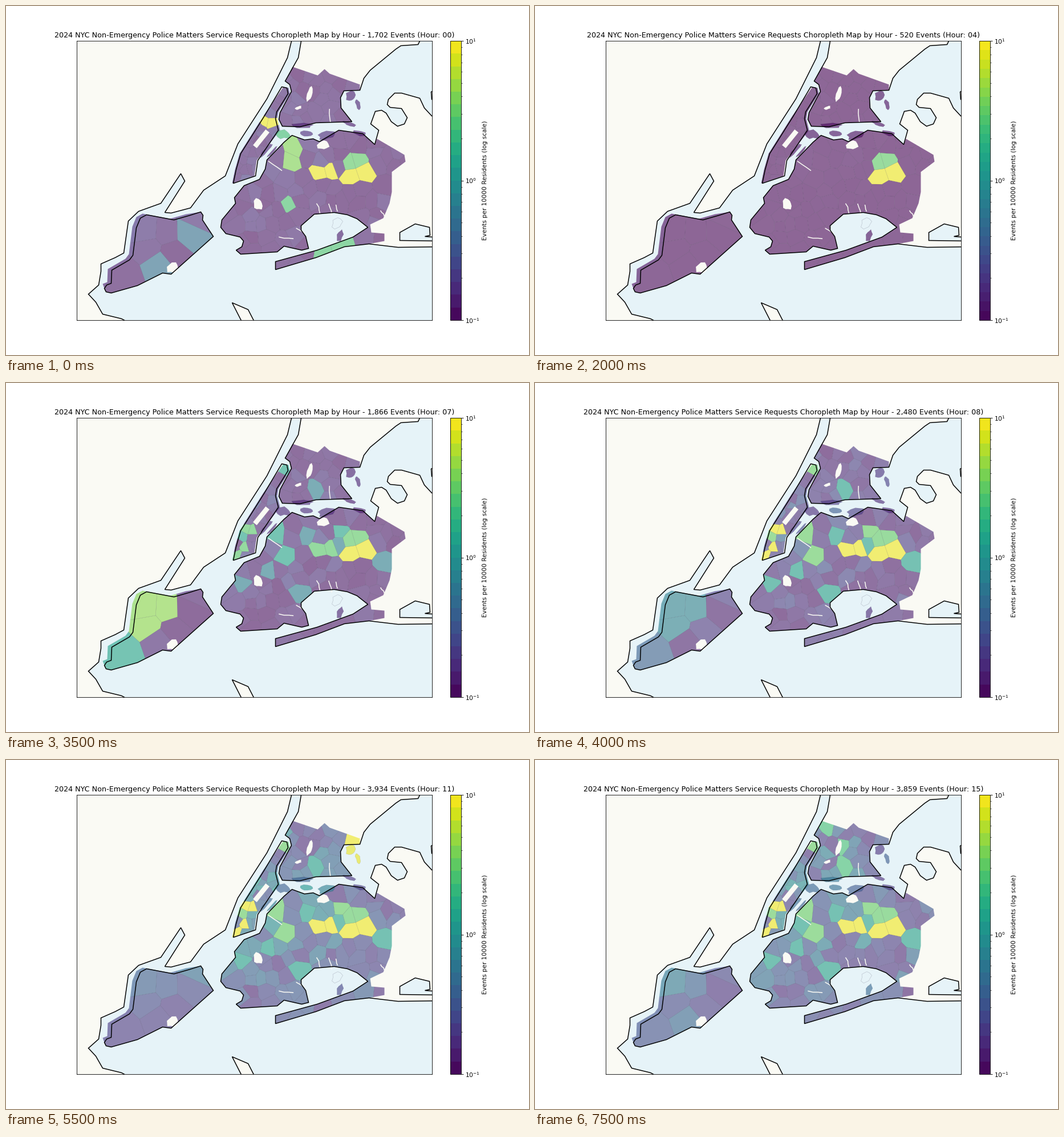
A matplotlib script that plays this animation: 917 px wide and 611 px high, repeating every 8000 ms.

```python
import numpy as np
import matplotlib.pyplot as plt
from matplotlib.animation import FuncAnimation
from matplotlib.cm import ScalarMappable
from matplotlib.collections import PolyCollection
from matplotlib.colors import ListedColormap, LogNorm
from matplotlib.patches import Polygon
from matplotlib.path import Path

W, H = 917, 611
K = W / 1200
LAND, WATER = "#fafaf4", "#e6f3f8"
viridis = plt.get_cmap("viridis")

plt.rcParams.update({
    "font.family": "DejaVu Sans", "font.size": 10 * K,
    "axes.linewidth": 0.8 * K, "axes.titlepad": 6 * K, "axes.labelpad": 4 * K,
    "ytick.major.size": 3.5 * K, "ytick.major.width": 0.8 * K,
    "ytick.major.pad": 3.5 * K,
    "ytick.minor.size": 2 * K, "ytick.minor.width": 0.6 * K,
})
fig = plt.figure(figsize=(W / 100, H / 100), dpi=100, facecolor="white")

# The map is laid out in stage pixels, y pointing down.
left, right, low, high = 0.1355, 0.8145, 0.1, 0.9
ax = fig.add_axes([left, low, right - left, high - low])
ax.set(xlim=(left * W - 0.5, right * W - 0.5),
       ylim=((1 - low) * H - 0.5, (1 - high) * H - 0.5),
       xticks=[], yticks=[], facecolor=WATER)


# --- Activity over the day ---------------------------------------------
def events(hour):
    known = [0, 4, 7, 9, 11, 13, 15]
    counts = [1702, 520, 1866, 3296, 3934, 3827, 3859]
    return round(np.exp(np.interp(hour, known, np.log(counts))))


def always(h):
    return 1


def night(h):
    return max(0, 1 - h / 4)


def day(h):
    return np.clip((h - 4) / 4, 0, 1)


def night_and_day(h):
    return min(1, abs(h - 4) / 4)


def pulse(peak):
    return lambda h: np.exp(-(h - peak) ** 2 / 1.5)


# Districts that stand out: profile, top colour level, places
HOT = [
    (always, 0.97, [(604, 296), (627, 288)]),
    (always, 0.74, [(601, 275), (618, 270)]),
    (night_and_day, 0.97, [(551, 290), (567, 286)]),
    (day, 0.97, [(422, 253), (431, 256), (405, 299), (417, 286)]),
    (day, 0.75, [(487, 150), (413, 270), (490, 305), (471, 265), (584, 260)]),
    (day, 0.55, [(583, 280), (525, 262), (508, 366), (540, 187), (665, 317),
                 (410, 350), (460, 330)]),
    (night, 0.97, [(453, 203), (463, 205)]),
    (night, 0.8, [(502, 268), (508, 255)]),
    (night, 0.7, [(556, 429), (585, 421), (486, 224), (495, 346)]),
    (night, 0.35, [(320, 396), (268, 450)]),
    (pulse(7), 0.82, [(245, 395), (280, 397), (250, 423)]),
    (pulse(7), 0.57, [(205, 472)]),
    (pulse(11), 0.97, [(603, 142), (604, 158), (617, 172)]),
    (pulse(13), 0.85, [(486, 224)]),
    (pulse(15), 0.68, [(511, 117), (541, 147), (540, 187)]),
]


# --- Coast ----------------------------------------------------------------
def coast(*pts, fill=LAND):
    ax.add_patch(Polygon(pts, fc=fill, ec="none", zorder=1))
    ax.add_patch(Polygon(pts, fill=False, ec="black", lw=1.4 * K, zorder=6))


BRONX_WEST = [(489, 131), (497, 137), (500, 149), (480, 186), (478, 198),
              (484, 210), (515, 211), (543, 204), (606, 202), (587, 178),
              (586, 160), (592, 148), (620, 147)]
MANHATTAN = [(483, 141), (492, 143), (494, 153), (474, 185), (472, 197),
             (477, 217), (441, 270), (437, 297), (398, 310), (403, 286),
             (411, 258), (452, 193)]
STATEN_SEA = [(341, 360), (345, 366), (344, 374), (363, 403), (289, 469),
              (274, 467), (230, 489), (184, 502), (175, 500), (172, 494)]
STATEN_KILL = [(176, 488), (184, 485), (185, 462), (216, 444), (222, 436),
               (228, 388), (235, 371), (246, 365), (294, 374), (322, 366)]
# Barrier beach, inner bay, west end and north shore of Long Island
ISLAND_SHORE = [
    (636, 416), (593, 421), (543, 440), (472, 461), (472, 447), (545, 427),
    (608, 404), (634, 387), (615, 372), (598, 365), (575, 361), (540, 364),
    (517, 384), (517, 392), (525, 403), (530, 424), (518, 427), (487, 420),
    (475, 430), (411, 434), (403, 427), (413, 421), (416, 411), (410, 404),
    (385, 398), (376, 387), (378, 374), (402, 345), (400, 335), (417, 314),
    (444, 303), (454, 285), (457, 269), (487, 238), (501, 226), (523, 234),
    (538, 232), (549, 237), (583, 217), (625, 223), (646, 242)]
EAST_COAST = [(653, 217), (639, 206), (647, 184), (658, 182), (666, 187),
              (675, 202), (686, 210), (698, 206), (703, 195), (693, 179),
              (673, 177), (668, 172), (670, 163), (681, 152), (693, 152),
              (725, 161), (733, 178), (746, 192), (760, 196)]
EAST_EDGE = [(650, 232), (698, 260), (700, 272), (676, 290), (676, 325),
             (672, 345), (661, 371), (638, 382), (640, 396), (663, 398),
             (663, 411)]

coast((501, 50), (500, 61), (493, 90), (457, 162), (406, 241), (384, 297),
      (346, 322), (323, 353), (289, 362), (278, 361), (313, 306), (306, 293),
      (271, 345), (232, 359), (214, 376), (206, 432), (191, 440), (166, 451),
      (166, 464), (162, 488), (144, 504), (157, 518), (169, 539), (202, 547),
      (215, 554), (110, 560), (110, 50))
coast((518, 50), (517, 61), (512, 90), *BRONX_WEST, (627, 126), (638, 112),
      (683, 75), (692, 69), (722, 67), (730, 50))
coast(*MANHATTAN)
coast(*STATEN_SEA, *STATEN_KILL)
coast((760, 421), (687, 422), *ISLAND_SHORE, *EAST_COAST)
coast((760, 411), (690, 410), (690, 396), (717, 381), (742, 387), (743, 401),
      (734, 403), (760, 405), fill=WATER)
coast((760, 140), (745, 150), (746, 163), (760, 170))
coast((396, 519), (424, 531), (440, 562), (418, 562))


# --- Districts --------------------------------------------------------------
def cut(poly, mid, normal):
    """Keep the part of poly behind the line through mid."""
    out = []
    for a, b in zip(poly, poly[1:] + poly[:1]):
        da, db = (a - mid) @ normal, (b - mid) @ normal
        if da <= 0:
            out.append(a)
        if da * db < 0:
            out.append(a + (b - a) * da / (da - db))
    return out


def gap(sites, p):
    return np.hypot(*(sites - np.array(p)).T)


def make_sites(outline, step, rng):
    """Jittered hexagonal grid that leaves room for the hot districts."""
    x0, y0 = np.min(outline, axis=0)
    x1, y1 = np.max(outline, axis=0)
    grid = np.array([(x + step / 2 * (j % 2), y)
                     for j, y in enumerate(np.arange(y0, y1, step * 0.87))
                     for x in np.arange(x0, x1, step)])
    sites = grid + rng.uniform(-0.36, 0.36, grid.shape) * step
    inside = Path(outline).contains_points
    spots = {p for _, _, places in HOT for p in places}
    for p in sorted(spots):
        if inside([p])[0]:
            sites = np.vstack([sites[gap(sites, p) > 0.75 * step], p]) \
                if min(gap(sites, p)) > 0 else sites
    # Neighbouring hot spots must all survive the thinning above.
    missing = [p for p in spots if inside([p])[0] and min(gap(sites, p)) > 0]
    sites = np.vstack([sites, *sorted(missing)])
    return sites[inside(sites)]


def voronoi(sites, step):
    square = np.array([(-1, -1), (1, -1), (1, 1), (-1, 1)]) * 3 * step
    cells = []
    for p in sites:
        cell = list(p + square)
        for q in sites:
            if 0 < np.hypot(*(q - p)) < 6 * step:
                cell = cut(cell, (p + q) / 2, q - p)
        cells.append(np.array(cell))
    return cells


areas = []


def add_area(sites, polys, busy, rng):
    coll = PolyCollection(polys, edgecolors=(0.2, 0.2, 0.3, 0.25),
                          linewidths=0.25, zorder=2)
    ax.add_collection(coll, autolim=False)
    fade = np.clip(1.4 - gap(sites, (480, 250)) / 260, 0.75, 1.3)
    hot = [(profile, top, gap(sites, p) < 1)
           for profile, top, places in HOT for p in places]
    areas.append((coll, busy * fade * (0.45 + 0.7 * rng.random(len(sites))),
                  rng.random((24, len(sites))), hot))
    return coll


def borough(outline, step, busy, seed):
    rng = np.random.default_rng(seed)
    sites = make_sites(outline, step, rng)
    coll = add_area(sites, voronoi(sites, step), busy, rng)
    coll.set_clip_path(Path(outline + outline[:1]), ax.transData)


def blob(x, y, rx, ry, angle=0, sides=11, wobble=0.25):
    rng = np.random.default_rng(x)
    t = 2 * np.pi * (np.arange(sides) + 0.5) / sides
    r = 1 + wobble * rng.uniform(-1, 1, sides)
    a = np.radians(angle)
    u, v = r * rx * np.cos(t), r * ry * np.sin(t)
    return np.c_[x + u * np.cos(a) - v * np.sin(a),
                 y + u * np.sin(a) + v * np.cos(a)]


def shift(pts, dx, dy):
    return [(x + dx, y + dy) for x, y in pts]


borough([(502, 106), (546, 121), (558, 110), (567, 118), (620, 137)]
        + BRONX_WEST[::-1], 21, 1.0, 3)
borough(shift(MANHATTAN[:6], 3, 0) + shift(MANHATTAN[6:], -2, 0), 14, 1.1, 8)
borough(ISLAND_SHORE + EAST_EDGE, 24, 1.0, 5)
borough(STATEN_SEA + shift(STATEN_KILL, -7, -2), 38, 1.2, 12)

islets = [(604, 158, 8, 9), (617, 172, 4, 9, -20), (486, 224, 11, 8),
          (527, 223, 11, 5), (456, 252, 16, 3, -46), (466, 255, 13, 2, -46),
          (561, 226, 14, 7, -15), (518, 209, 18, 4), (619, 222, 13, 4, 15),
          (602, 206, 12, 3, 15), (585, 401, 5, 10, 15)]
add_area(np.array([i[:2] for i in islets], float), [blob(*i) for i in islets],
         1.0, np.random.default_rng(1))

# Parks, creeks and the marsh
for park in ((447, 232, 25, 6, -51, 4, 0), (442, 347, 8, 10),
             (532, 154, 5, 13, 10), (512, 178, 6, 3, -25),
             (291, 458, 12, 9, -15), (556, 243, 10, 9)):
    ax.add_patch(Polygon(blob(*park), fc=LAND, ec="none", zorder=3))
rng = np.random.default_rng(4)
for x, y, dx, dy in ((545, 346, 2, 5), (567, 346, 2, 5), (580, 347, 1, 4),
                     (655, 360, 2, 4), (480, 403, 8, 1), (508, 388, 5, 3),
                     (458, 272, 8, 5), (568, 179, 0, 7)):
    walk = np.cumsum([(dx, dy)] * 4 + rng.normal(0, 1, (4, 2)), axis=0)
    ax.plot(x + walk[:, 0] - dx, y + walk[:, 1] - dy, color=LAND, lw=1.1,
            zorder=3)
ax.add_patch(Polygon(blob(580, 380, 9, 10), fill=False, ec="#b4bcc8", lw=0.4,
                     zorder=3))


# --- Colour bar and title -----------------------------------------------------
def bands(n):
    return ListedColormap(viridis((np.arange(n) + 0.5) / n))


scale = ScalarMappable(LogNorm(0.1, 10), bands(22))
bar = fig.colorbar(scale, cax=fig.add_axes([0.85, low, 0.02, high - low]))
bar.set_label("Events per 10000 Residents (log scale)")
title = ax.set_title("")


def update(hour):
    count = events(hour)
    mean = 0.036 * (count / 1000) ** 1.5
    for coll, own, noise, hot in areas:
        level = mean * own * (0.7 + 0.9 * noise[hour])
        for profile, top, mask in hot:
            level[mask] = np.maximum(level[mask], top * profile(hour))
        coll.set_facecolor(viridis(np.clip(level, 0.01, 0.98), alpha=0.6))
    scale.set_cmap(bands(30 if count < 1000 else 22))
    title.set_text(
        "2024 NYC Non-Emergency Police Matters Service Requests Choropleth Map"
        f" by Hour - {count:,} Events (Hour: {hour:02d})")
    return []


anim = FuncAnimation(fig, update, frames=16, interval=500,
                     repeat=True, repeat_delay=0, blit=False)
plt.show()
```
